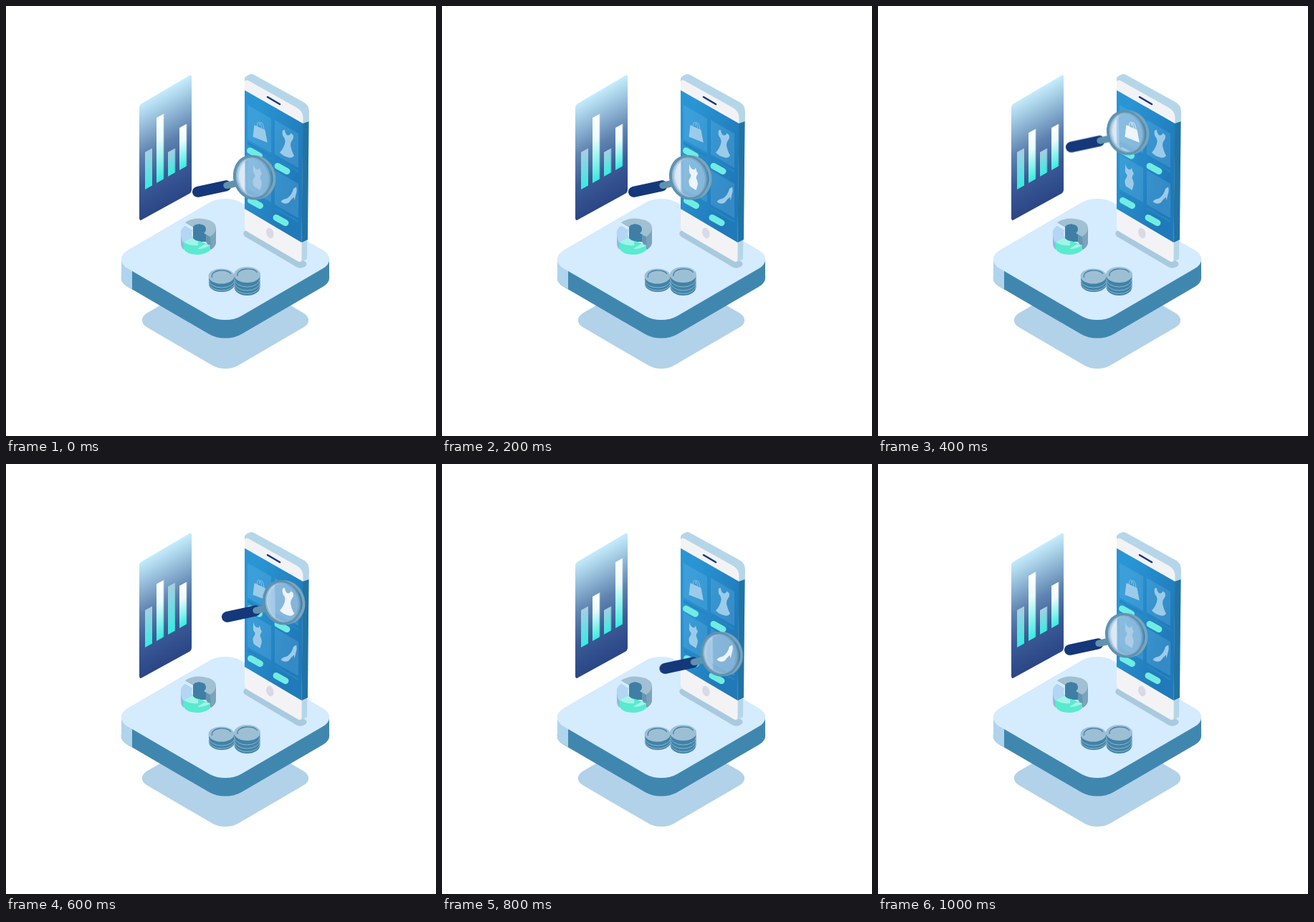
An HTML page that plays this animation: 600x600 px, repeating every 1200 ms.

```html
<!DOCTYPE html>
<html lang="en">
<head>
<meta charset="utf-8">
<title>Isometric shop</title>
<style>
  html, body { margin: 0; width: 100%; height: 100%; overflow: hidden; background: #fff; }
  svg { display: block; width: 100%; height: 100%; }

  .lens, .bar, .lit { animation: 1200ms step-end infinite; }
  .lens { animation-name: roam; }
  .bar { transform-box: fill-box; transform-origin: 0 100%; }
  .b2 { animation-name: second; }
  .b3 { animation-name: third; }
  .b4 { animation-name: fourth; }
  .lit { fill: #eef5fb; color: #eef5fb; animation-name: glow; }
  .dim { fill: #9ccbe9; color: #9ccbe9; }
  .gown { animation-delay: -1000ms; }
  .bag { animation-delay: -800ms; }
  .frock { animation-delay: -600ms; }
  .shoe { animation-delay: -400ms; }

  @keyframes roam {
    0%, 83.33% { transform: translate(0, 0); }
    33.33% { transform: translate(2px, -62.5px); }
    50% { transform: translate(41px, -46px); }
    66.66% { transform: translate(43.5px, 26px); }
    100% { transform: translate(0, 0); }
  }
  @keyframes second {
    0%, 83.33%, 100% { transform: scaleY(1); }
    33.33% { transform: scaleY(.769); }
    50% { transform: scaleY(.873); }
    66.66% { transform: scaleY(.681); }
  }
  @keyframes third {
    0%, 66.66%, 100% { transform: scaleY(1); }
    50% { transform: scaleY(1.97); }
  }
  @keyframes fourth {
    0%, 83.33%, 100% { transform: scaleY(1); }
    66.66% { transform: scaleY(1.56); }
  }
  @keyframes glow {
    0% { opacity: 1; }
    16.66%, 100% { opacity: 0; }
  }
</style>
</head>
<body>
<svg viewBox="0 0 600 600" xmlns="http://www.w3.org/2000/svg">
  <defs>
    <linearGradient id="board" gradientUnits="userSpaceOnUse" x1="222" y1="117.500" x2="290" y2="239">
      <stop offset="0" stop-color="#c4ebfb"/>
      <stop offset=".14" stop-color="#a4cce4"/>
      <stop offset=".45" stop-color="#5f84b1"/>
      <stop offset=".72" stop-color="#3b5b96"/>
      <stop offset="1" stop-color="#2c4787"/>
    </linearGradient>
    <linearGradient id="bright" x2="0" y2="1">
      <stop offset="0" stop-color="#fff"/>
      <stop offset=".35" stop-color="#ecfbfb"/>
      <stop offset="1" stop-color="#35ece0"/>
    </linearGradient>
    <linearGradient id="pale" x2="0" y2="1">
      <stop offset="0" stop-color="#a9cee2"/>
      <stop offset="1" stop-color="#35ece0"/>
    </linearGradient>
    <linearGradient id="screen" gradientUnits="userSpaceOnUse" x1="333" y1="200" x2="414" y2="225">
      <stop offset="0" stop-color="#2a95d4"/>
      <stop offset="1" stop-color="#2079b9"/>
    </linearGradient>
    <linearGradient id="glass" x1="0" y1=".3" x2="1" y2=".6">
      <stop offset="0" stop-color="#bfdcf3" stop-opacity=".8"/>
      <stop offset=".32" stop-color="#d5e3f2" stop-opacity=".72"/>
      <stop offset=".34" stop-color="#b9cfe4" stop-opacity=".62"/>
      <stop offset="1" stop-color="#b4cde4" stop-opacity=".62"/>
    </linearGradient>
    <clipPath id="corner"><path d="M150 340H176V410H150Z"/></clipPath>

    <rect id="slab" x="-92" y="-92" width="184" height="184" rx="25.500" transform="matrix(.859 .5 -.859 .5 306 353.500)"/>
    <g id="side">
      <use href="#slab" y="25.500"/>
      <path d="M161 353.500H451V379H161Z"/>
    </g>
    <path id="tile" d="M0 0L33 19V67L0 48Z"/>
    <path id="pill" d="M-6.5 -3.6L6.5 3.6" stroke-width="9" stroke-linecap="round"/>

    <g id="bag">
      <path d="M346.500 166L361.500 173L364.800 190.500L344.500 182.500Z"/>
      <path d="M350.500 168C350 160 355 159 357 171M353.500 167C354 159 359 162 360 173" fill="none" stroke="currentColor" stroke-width=".8"/>
    </g>
    <path id="frock" d="M386 173.500L389 173Q389.500 179 393 180.500Q396 181 397.500 177.500L400.500 180Q402 185 399 187.500Q396.500 191 397 195Q399 204 402 208.500Q399 213.500 393 211Q387 209.500 382 204.500Q388 198 389.500 190Q390 186 386.500 181.500Q385 178 386 173.500Z"/>
    <path id="gown" d="M345 221Q347 227 350 228Q353 229 354 225.500Q354.500 230 357 234Q354.500 237 354.500 240Q357.500 246 356.500 250L354.500 257L346 251.500Q343.500 246 345 242Q348 238 347.500 235.500Q344 232 345 227Z"/>
    <path id="shoe" d="M383.500 273Q385.500 269.500 392 268.500Q399 264 401 255L405 252.500Q406.500 258 404.500 263L402.500 271.500L401.800 266.500Q397.500 270 394.500 274.500Q388 277.500 383.500 273Z"/>
  </defs>

  <!-- platform -->
  <use href="#slab" fill="#b2d2ea" transform="translate(61.2 155.600) scale(.8)"/>
  <use href="#side" fill="#4087af"/>
  <use href="#side" fill="#b0d4ed" clip-path="url(#corner)"/>
  <use href="#slab" fill="#d5ebfe"/>

  <!-- chart board -->
  <path d="M186 142Q186 138 189.500 136L255 97.500Q259 95 259 99V256Q259 260 255.500 262L190 298Q186 300.500 186 296Z" fill="url(#board)"/>
  <g transform="matrix(1 -.56 0 1 194 256)">
    <rect class="bar" y="-52" width="10" height="52" fill="url(#pale)"/>
    <rect class="bar b2" x="16" y="-91" width="10" height="91" fill="url(#bright)"/>
    <rect class="bar b3" x="32" y="-34" width="10" height="34" fill="url(#pale)"/>
    <rect class="bar b4" x="48" y="-59" width="10" height="59" fill="url(#bright)"/>
  </g>

  <!-- ring chart -->
  <path d="M250 302L262 309V329H279L286 340Q293 335 293 329V310Z" fill="#6796b3"/>
  <path d="M261 308Q263 304 270 304Q279 305 279 311V329H261Z" fill="#3f7fa5"/>
  <path d="M250 302Q259 296 270 296.500Q293 298 293 310Q293 317 285 322L276 317Q279 315 279 311Q279 305 270 304Q264 304 261 308Z" fill="#a1c0d2"/>
  <path d="M285 322Q293 317 293 310V329Q293 335 286 340Z" fill="#7ba4bc"/>
  <path d="M244 317Q244 311 250 307L260 313Q257 319 261 324L248 331V340Q244 337 244 331Z" fill="#8fbbe4"/>
  <path d="M244 317Q244 311 250 307L260 313Q257 319 261 324L248 331Q244 326 244 317Z" fill="#b2d6f4"/>
  <path d="M248 329L260 323Q264 328 270 328L285 334V341Q277 347 266 347Q251 346 248 339Z" fill="#59ead0"/>
  <path d="M248 329L260 323Q264 328 268 328V334Q254 335 248 329Z" fill="#a4f3e8"/>
  <path d="M268 338L278 332L285 334Q277 339 268 339Z" fill="#a4f3e8"/>

  <!-- coins -->
  <g fill="#4083a8" stroke="#8fb6cd" stroke-width="1">
    <path d="M283 378V388A18 11 0 0 0 319 388V378Z" stroke="none"/>
    <path d="M283 382A18 11 0 0 0 319 382M283 386A18 11 0 0 0 319 386" fill="none"/>
    <path d="M318.500 376V392A18 12 0 0 0 354.500 392V376Z" stroke="none"/>
    <path d="M318.500 380A18 12 0 0 0 354.500 380M318.500 385A18 12 0 0 0 354.500 385M318.500 389.500A18 12 0 0 0 354.500 389.500" fill="none"/>
  </g>
  <g fill="#9dbfd4">
    <ellipse cx="300.500" cy="377" rx="18" ry="10.500"/>
    <ellipse cx="336.500" cy="375" rx="18.500" ry="11"/>
    <g stroke="#4083a8" stroke-width="1.300">
      <path d="M287.500 379C285 367 309 366 314 374" fill="none"/>
      <path d="M323 377C321 365 346 364 350.500 372" fill="none"/>
    </g>
  </g>

  <!-- phone -->
  <path d="M333 314Q329 318 334 322L405 364Q411 368 418 363Q421 360 418 357L345 312Z" fill="#a9cade"/>
  <path d="M333 104V101Q334 98 339 96Q342 94 346 96L415 134Q423 138 423 148L420 353L412 357Z" fill="#b5d6e9"/>
  <path d="M333 108Q333 102 338 104L406 142Q414.500 147 414.500 156L412.500 354Q412 358.500 407 356L337 315Q333 312 333 308Z" fill="#f3f3f5"/>
  <path d="M414 164L422.500 161L421 326L412.500 330Z" fill="#2173a5"/>
  <path d="M333 117.500L414.500 164L412.500 330L333 283Z" fill="url(#screen)"/>
  <path d="M365 127L382 137" stroke="#17387c" stroke-width="2.600" stroke-linecap="round"/>
  <ellipse cx="368.300" cy="317" rx="5" ry="7.500" transform="rotate(-18 368 317)" fill="#dad9e8"/>

  <g fill="#7cc3ea" fill-opacity=".22">
    <use href="#tile" x="337" y="138"/>
    <use href="#tile" x="375" y="159"/>
    <use href="#tile" x="337" y="207"/>
    <use href="#tile" x="375" y="229"/>
  </g>
  <path d="M337 191L370 210M375 212L408 231M337 260L370 279M375 282L408 301" stroke="#2784c2" stroke-width="3"/>
  <g stroke="#70ece2">
    <use href="#pill" x="347" y="205.500"/>
    <use href="#pill" x="385.500" y="227"/>
    <use href="#pill" x="348" y="275"/>
    <use href="#pill" x="383.500" y="299"/>
  </g>
  <g class="dim">
    <use href="#bag"/>
    <use href="#frock"/>
    <use href="#gown"/>
    <use href="#shoe"/>
  </g>

  <!-- magnifier -->
  <g class="lens">
    <path d="M267.500 259.300L307 250.800" stroke="#14387a" stroke-width="15" stroke-linecap="round"/>
    <path d="M308 250.300L322 247.300" stroke="#6092b0" stroke-width="9.500" stroke-linecap="round"/>
    <g transform="rotate(-15 345 239)" fill="none">
      <ellipse cx="348.500" cy="240" rx="25.500" ry="29" stroke="#7ba4ba" stroke-width="4"/>
      <ellipse cx="344" cy="239" rx="24.800" ry="29.500" fill="url(#glass)" stroke="#5d92b3" stroke-width="4"/>
      <ellipse cx="345" cy="239" rx="22.800" ry="27.500" stroke="#8bb0c8" stroke-width="1.200"/>
    </g>
  </g>

  <use href="#gown" class="lit gown"/>
  <use href="#bag" class="lit bag"/>
  <use href="#frock" class="lit frock"/>
  <use href="#shoe" class="lit shoe"/>
</svg>
</body>
</html>
```
